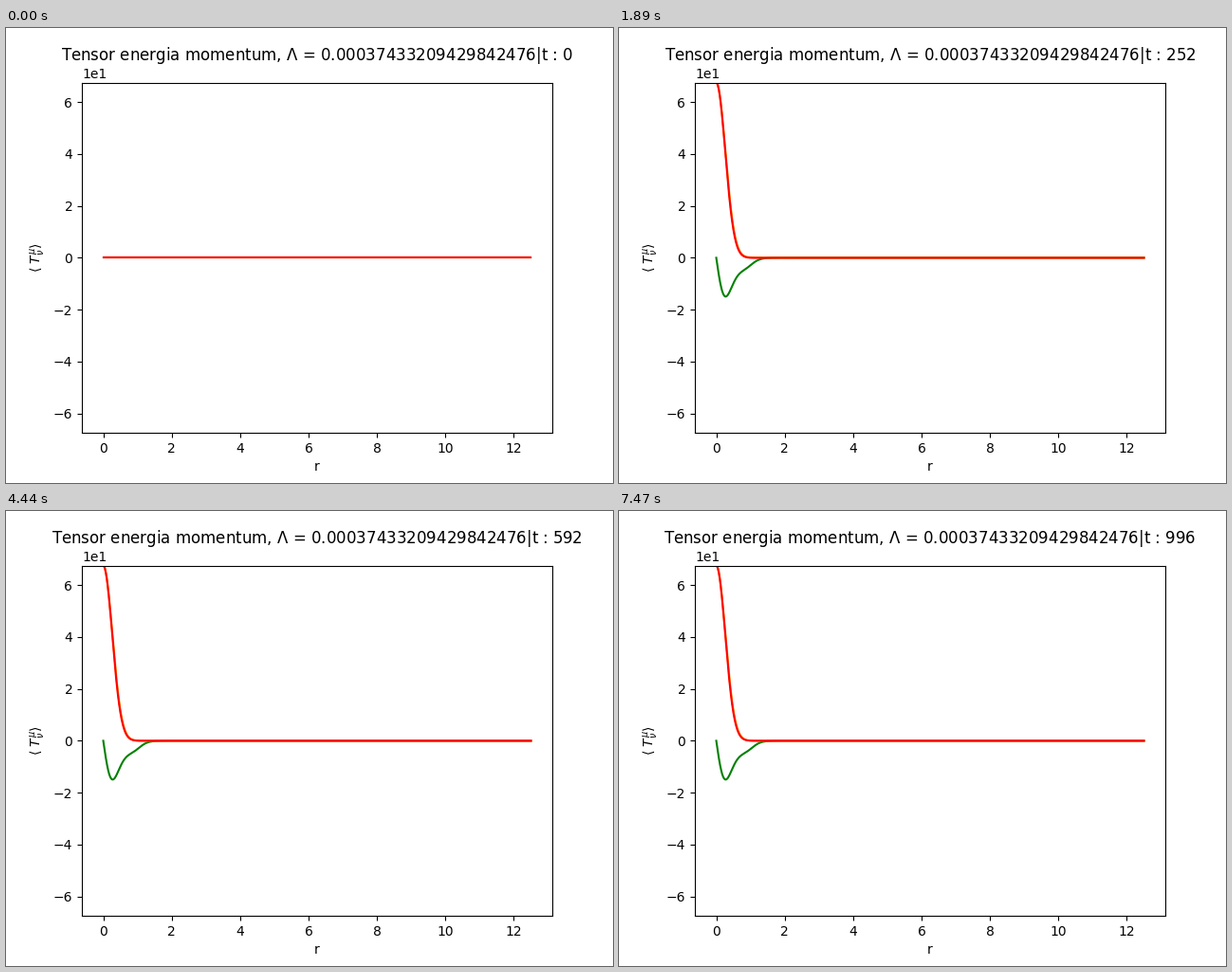
Recreate the animation shown at these times as a matplotlib script. Size 640 by 480 pixels, loop 7.5 s.

```python
import numpy as np
import matplotlib.pyplot as plt
from matplotlib.animation import FuncAnimation

FRAMES, INTERVAL, STEP = 250, 30, 4
PEAK = 67.5
LAMBDA = "0.00037433209429842476"

r = np.linspace(0, 12.5, 1001)


def bump(center, width):
    return np.exp(-((r - center) / width) ** 2)


def profiles(t):
    """Flux, density and pressure, growing and then freezing."""
    growth = 1 - np.exp(-(t / 72) ** 2)
    lag = np.exp(-t / 70)
    front = 1.05 * (1 - lag)

    inner = 73.9 * r * bump(0, .354)
    shelf = 5.3 * np.tanh(r / .3) * (1 - np.tanh((r - front) / .25)) / 2
    ripple = lag * bump(1.05, .22)

    flux = -inner - shelf
    density = PEAK * bump(0, .38) + 4 * ripple
    pressure = PEAK * bump(0, .37) - 2 * ripple
    return growth * flux, growth * density, growth * pressure


fig, ax = plt.subplots(figsize=(6.4, 4.8), dpi=100)
lines = [ax.plot(r, 0 * r, color=c)[0] for c in ("green", "darkorange", "red")]
ax.set_ylim(-PEAK, PEAK)
ax.ticklabel_format(axis="y", style="sci", scilimits=(0, 0))
ax.set_xlabel("r")
ax.set_ylabel(r"$\langle\ T^{\mu}_{\nu} \rangle$")
title = ax.set_title("")


def update(i):
    t = STEP * i
    for line, y in zip(lines, profiles(t)):
        line.set_ydata(y)
    title.set_text(rf"Tensor energia momentum, $\Lambda$ = {LAMBDA}|t : {t}")
    return *lines, title


anim = FuncAnimation(fig, update, frames=FRAMES, interval=INTERVAL,
                     repeat=True, repeat_delay=0, blit=False)
plt.show()
```
